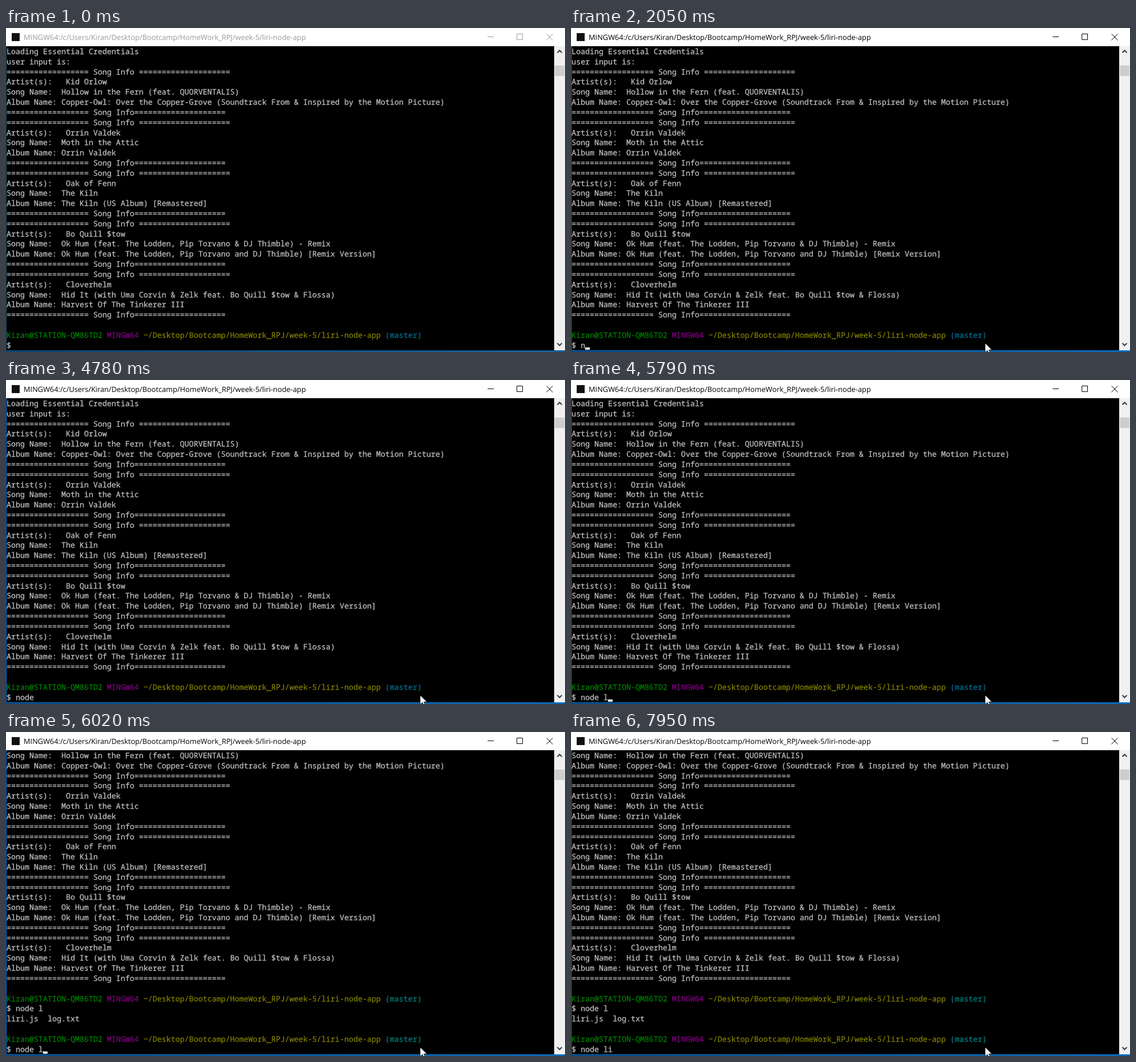
These frames come from a looping animation (982x570 px, 8000 ms). An HTML page:

```html
<!DOCTYPE html>
<html lang="en">
<head>
<meta charset="utf-8">
<style>
  html, body { margin: 0; width: 100%; height: 100%; overflow: hidden; background: #000; }
  pre, svg { position: absolute; margin: 0; text-rendering: geometricPrecision; }
  svg { left: 0; top: 0; }
  pre {
    left: 1px; top: 33px; color: #c4c4c4;
    font: 13.365px/17.82px "Noto Sans Mono", monospace;
    font-variant-ligatures: none;
    -webkit-text-stroke: .25px currentColor;
  }
  .user { color: #008000; }
  .sys { color: #800080; }
  .path { color: #808000; }
  .branch { color: var(--branch); }
  #title { font: 12.83px "Open Sans", sans-serif; }
</style>
</head>
<body>
<pre id="term"></pre>
<svg width="982" height="570">
  <linearGradient id="desktop">
    <stop stop-color="#0a4272"/>
    <stop offset="1" stop-color="#1068b0"/>
  </linearGradient>
  <path d="M0 0H982V32H0z" fill="#fff"/>
  <rect x="10" y="9" width="14" height="14" fill="#111"/>
  <text id="title" x="31" y="20.5">MINGW64:/c/Users/Kiran/Desktop/Bootcamp/HomeWork_RPJ/week-5/liri-node-app</text>
  <path id="buttons" d="M846 15.500h11M897.500 10.500h10v10h-10zM949.500 10.500l11 11M960.500 10.500l-11 11" fill="none"/>
  <path d="M963 32h19v535h-19z" fill="#f0f0f0"/>
  <path d="M964 66h17v18.500h-17z" fill="#cdcdcd"/>
  <path d="M968.500 43.500l4-4 4 4M968.500 554.500l4 4 4-4" fill="none" stroke="#333c48" stroke-width="2"/>
  <rect y="567" width="982" height="3" fill="url(#desktop)"/>
  <path id="border" d="M.5 32V567.500H982" fill="none"/>
  <rect id="caret" width="8" height="4" y="562" fill="#fff"/>
  <circle id="click" cx="727.5" cy="554" r="13" fill="#ff0" fill-opacity=".47"/>
  <path id="mouse" d="M0 0V16.500l4-3.800 2.600 5.800 2.600-1.100-2.600-5.700h5.400z" fill="#fff" stroke="#000" stroke-width=".8"/>
</svg>
<script>
const LOOP = 8000, ROWS = 30, PITCH = 8.019;
const ACTIVE = 1040, LIST = 5940, LISTED = 6020;

const songs = [
  ["Kid Orlow", "Hollow in the Fern (feat. QUORVENTALIS)",
    "Copper-Owl: Over the Copper-Grove (Soundtrack From &amp; Inspired by the Motion Picture)"],
  ["Orrin Valdek", "Moth in the Attic", "Orrin Valdek"],
  ["Oak of Fenn", "The Kiln", "The Kiln (US Album) [Remastered]"],
  ["Bo Quill $tow", "Ok Hum (feat. The Lodden, Pip Torvano &amp; DJ Thimble) - Remix",
    "Ok Hum (feat. The Lodden, Pip Torvano and DJ Thimble) [Remix Version]"],
  ["Cloverhelm", "Hid It (with Uma Corvin &amp; Zelk feat. Bo Quill $tow &amp; Flossa)",
    "Harvest Of The Tinkerer III"],
];
const head = "=".repeat(18) + " Song Info", tail = "=".repeat(20);
const prompt = '<span class="user">Kiran@STATION-QM86TD2</span> <span class="sys">MINGW64</span> ' +
  '<span class="path">~/Desktop/Bootcamp/HomeWork_RPJ/week-5/liri-node-app</span> <span class="branch">(master)</span>';
const output = [
  "Loading Essential Credentials", "user input is:",
  ...songs.flatMap(([artist, song, album]) => [
    head + " " + tail, "Artist(s):   " + artist, "Song Name:  " + song, "Album Name: " + album, head + tail]),
  "", prompt,
];

const command = "node li";
const keyTimes = [2050, 2450, 2770, 3000, 3310, 5100, 7870];
// The caret alternates between shown and hidden at these times.
const caretTimes = [1590, 2140, 2450, 2680, 2770, 3150, 3310, 3700, 4240, 4780,
  5100, 5250, 5790, 6340, 6860, 7410, 7870, 7950];

const $ = id => document.getElementById(id);
const passed = (times, t) => times.filter(at => at <= t).length;
const set = (id, attrs) => Object.entries(attrs).forEach(([k, v]) => $(id).setAttribute(k, v));
const show = (id, on) => set(id, { visibility: on ? "visible" : "hidden" });
let shown;

function drawTerminal(t) {
  const typed = "$ " + command.slice(0, passed(keyTimes, t));
  const lines = [...output];
  if (t < LIST) lines.push(typed);
  else if (t < LISTED) lines.push("$ node l", "");
  else lines.push("$ node l", "liri.js  log.txt", "", prompt, typed);

  const html = lines.slice(-ROWS).join("\n");
  if (html !== shown) $("term").innerHTML = shown = html;
  $("term").style.setProperty("--branch", t < LIST ? "#006d93" : "#008080");

  const column = t >= LIST && t < LISTED ? 0 : typed.length;
  set("caret", { x: Math.round(1 + column * PITCH) });
  show("caret", passed(caretTimes, t) % 2);
}

function drawWindow(t) {
  const active = t >= ACTIVE;
  set("title", { fill: active ? "#000" : "#999" });
  set("buttons", { stroke: active ? "#000" : "#999" });
  set("border", { stroke: active ? "#0078d7" : "#1c4a66" });
}

function drawMouse(t) {
  const k = Math.min(5, Math.floor((t - 440) / 76)) / 5;
  const x = 759 - 31.5 * k, y = 554.5 - 24 * Math.sin(Math.PI * k);
  set("mouse", { transform: `translate(${x} ${y})` });
  show("mouse", t >= 440);
  show("click", t >= ACTIVE && t < 1210);
}

function frame() {
  const t = performance.now() % LOOP;
  drawTerminal(t);
  drawWindow(t);
  drawMouse(t);
  requestAnimationFrame(frame);
}
frame();
</script>
</body>
</html>
```
